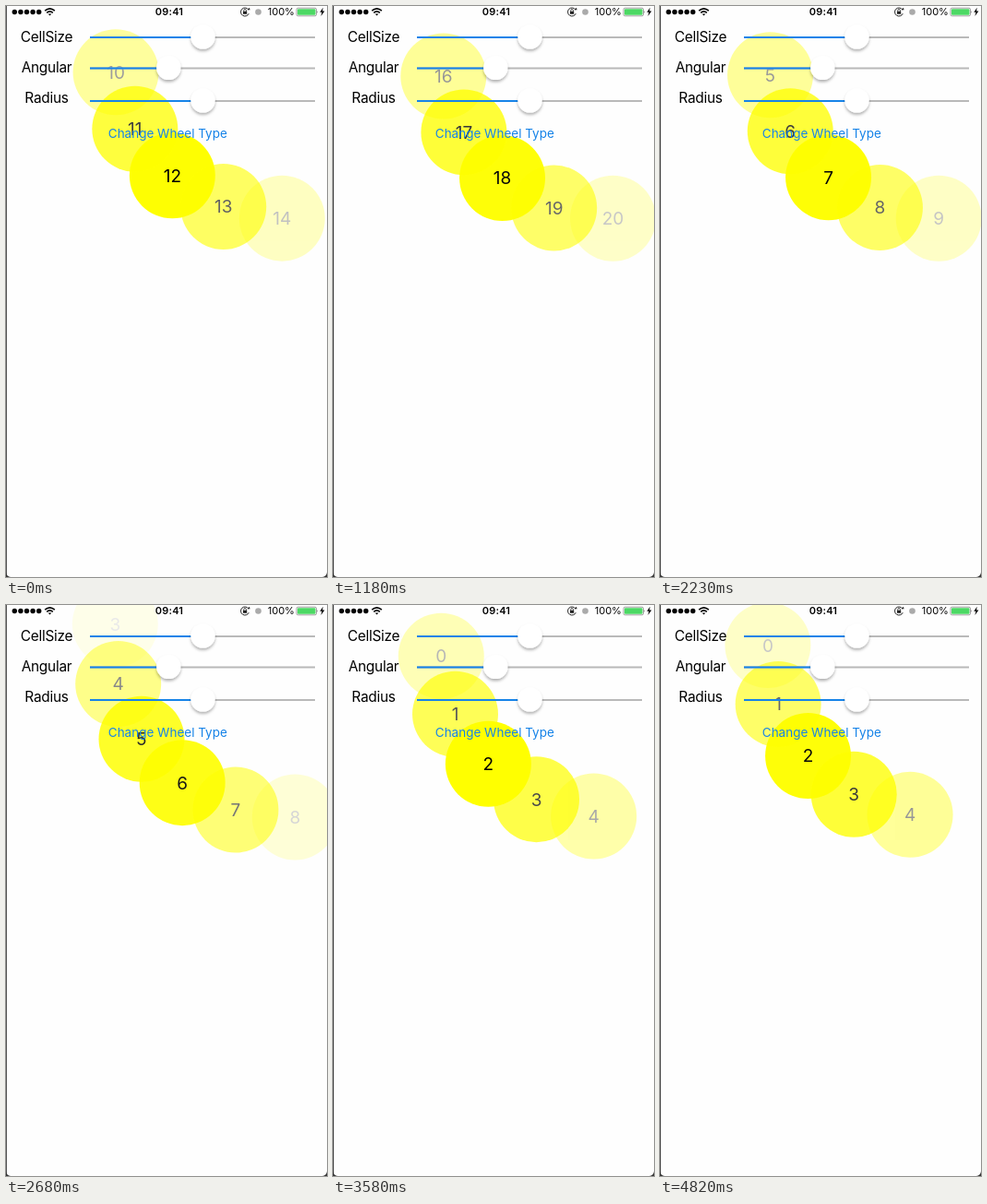
Recreate the animation shown at these times as an HTML page. Size 348 by 619 pixels, loop 4920 ms.

```html
<!DOCTYPE html>
<html lang="en">
<head>
<meta charset="utf-8">
<title>Wheel picker</title>
<style>
  html, body { margin: 0; width: 100%; height: 100%; overflow: hidden; background: #fefefe; }
  svg { display: block; width: 348px; height: 619px; font-family: Inter, Roboto, sans-serif; }
  text { text-anchor: middle; }
  .label { font-size: 15.4px; letter-spacing: -.25px; }
  .status { font-size: 11px; }
  .number { font-size: 19px; }
</style>
</head>
<body>
<svg viewBox="0 0 348 619">
  <defs>
    <filter id="shadow" x="-40%" y="-40%" width="180%" height="190%">
      <feDropShadow dx="0" dy="2.3" stdDeviation="1.5" flood-opacity=".3"/>
    </filter>
  </defs>
  <rect width="348" height="619" fill="#fefefe"/>
  <g id="wheel"></g>

  <g id="dots"></g>
  <g fill="none" stroke="#000" stroke-width="1.6">
    <path d="M42.2 5.2Q47.5 .4 52.8 5.2M44.2 7.4Q47.5 4.5 50.8 7.4"/>
    <path d="M45.7 8.4h3.6L47.5 10.4z" fill="#000" stroke="none"/>
  </g>
  <text class="status" x="177" y="10.3" font-weight="600" letter-spacing=".2">09:41</text>
  <g fill="none" stroke="#222">
    <path d="M262.8 4A4.5 4.5 0 1 0 263.2 8.2"/>
    <path d="M257.8 6V4.8a1.3 1.3 0 0 1 2.6 0V6" stroke-width=".8"/>
    <path d="M257 5.8h4.2v3H257z" fill="#222" stroke="none"/>
    <path d="M261.5 4.3h3.1l-.8-2.6z" fill="#222" stroke="none"/>
  </g>
  <circle cx="273.5" cy="6.5" r="3.3" fill="#aaa"/>
  <text class="status" x="298.3" y="10.3">100%</text>
  <rect x="315" y="2.2" width="21.5" height="8.6" rx="1.6" fill="#fff" stroke="#777" stroke-width=".7"/>
  <rect x="316" y="3.2" width="19.5" height="6.6" rx=".8" fill="#4cd964"/>
  <path d="M337.2 5q1.5 1.5 0 3z" fill="#777"/>
  <path d="M343.7 1.8l-3.4 5h2.2l-1.1 4.1 4-5.4h-2.3z"/>

  <g id="sliders"></g>
  <text class="label" x="44" y="38.5">CellSize</text>
  <text class="label" x="44" y="71.7">Angular</text>
  <text class="label" x="44" y="104.8">Radius</text>
  <text x="175.3" y="142.8" font-size="13.5" fill="#1683e8">Change Wheel Type</text>

  <path d="M.5 0V619" stroke="#555"/>
  <path d="M0 614Q.6 618.4 5 619H0zM348 614Q347.4 618.4 343 619H348z" fill="#333"/>
</svg>
<script>
const LOOP = 4920, STEP = 148.7;
const HUB = { x: 303.5, y: 43.6, radius: 186.6 };
const SPACING = 20, FOCUS = 45, CUTOFF = 53.5;

// [step, item number at the focus angle]: two flicks that glide out, then a drag past the end that springs back
const SCROLL = [
  [0, 11.815], [1, 13.9], [3, 15.918], [5, 17.1], [8, 17.75],
  [9, 17.05], [10, 13.85], [12, 9.745], [15, 6.77], [18, 5.6],
  [20, 4.9], [22, 2.9], [23, 2.33], [24, 2.07], [25, 1.97], [27, 2.13], [30, 2.25], [32, 2.25]
];

const byId = id => document.getElementById(id);

function add(parent, tag, attributes) {
  const node = document.createElementNS("http://www.w3.org/2000/svg", tag);
  for (const name in attributes) node.setAttribute(name, attributes[name]);
  return parent.appendChild(node);
}

for (let i = 0; i < 5; i++) add(byId("dots"), "circle", { cx: 9.3 + i * 6.6, cy: 6.5, r: 2.7 });

for (const [y, x] of [[34, 213.5], [67.5, 176.3], [103, 213.5]]) {
  const sliders = byId("sliders");
  add(sliders, "path", { d: `M91 ${y}H335`, stroke: "#b9b9b9", "stroke-width": 1.9 });
  add(sliders, "path", { d: `M91 ${y}H${x}`, stroke: "#1683e8", "stroke-width": 1.9 });
  add(sliders, "circle", { cx: x, cy: y - .6, r: 13.2, fill: "#fff", filter: "url(#shadow)" });
}

const cells = Array.from({ length: 23 }, (_, index) => {
  const node = add(byId("wheel"), "g", {});
  add(node, "circle", { r: 46.5, fill: "#ff0" });
  add(node, "text", { y: 6.9, class: "number" }).textContent = index;
  return { index, node };
});

function slope(i) {
  const [a, b] = [SCROLL[i], SCROLL[i + 1]];
  return a && b ? (b[1] - a[1]) / (b[0] - a[0]) : 0;
}

// Harmonic mean of neighbouring slopes, zero at turning points
function tangent(i) {
  const before = slope(i - 1), after = slope(i);
  return before * after > 0 ? 2 * before * after / (before + after) : 0;
}

function scrollAt(step) {
  const i = Math.max(0, SCROLL.findIndex(key => key[0] >= step) - 1);
  const [x0, y0] = SCROLL[i], [x1, y1] = SCROLL[i + 1];
  const width = x1 - x0, u = (step - x0) / width, v = 1 - u;
  return v * v * ((1 + 2 * u) * y0 + u * width * tangent(i))
       + u * u * ((3 - 2 * u) * y1 - v * width * tangent(i + 1));
}

function drawWheel(position) {
  for (const cell of cells) {
    const angle = FOCUS + SPACING * (position - cell.index);
    const radians = angle * Math.PI / 180;
    const x = HUB.x - HUB.radius * Math.sin(radians);
    const y = HUB.y + HUB.radius * Math.cos(radians);
    cell.distance = Math.abs(angle - FOCUS);
    const opacity = cell.distance < CUTOFF ? Math.min(1, 1.06 - cell.distance / 53) : 0;
    cell.node.setAttribute("transform", `translate(${x} ${y})`);
    cell.node.setAttribute("opacity", opacity);
  }
  const order = [...cells].sort((a, b) => b.distance - a.distance);
  byId("wheel").append(...order.map(cell => cell.node));
}

let shownStep = -1;
function frame() {
  const time = performance.now() % LOOP;
  const step = Math.min(32, Math.floor((time + 12) / STEP));
  if (step !== shownStep) drawWheel(scrollAt(shownStep = step));
  requestAnimationFrame(frame);
}
frame();
</script>
</body>
</html>
```
